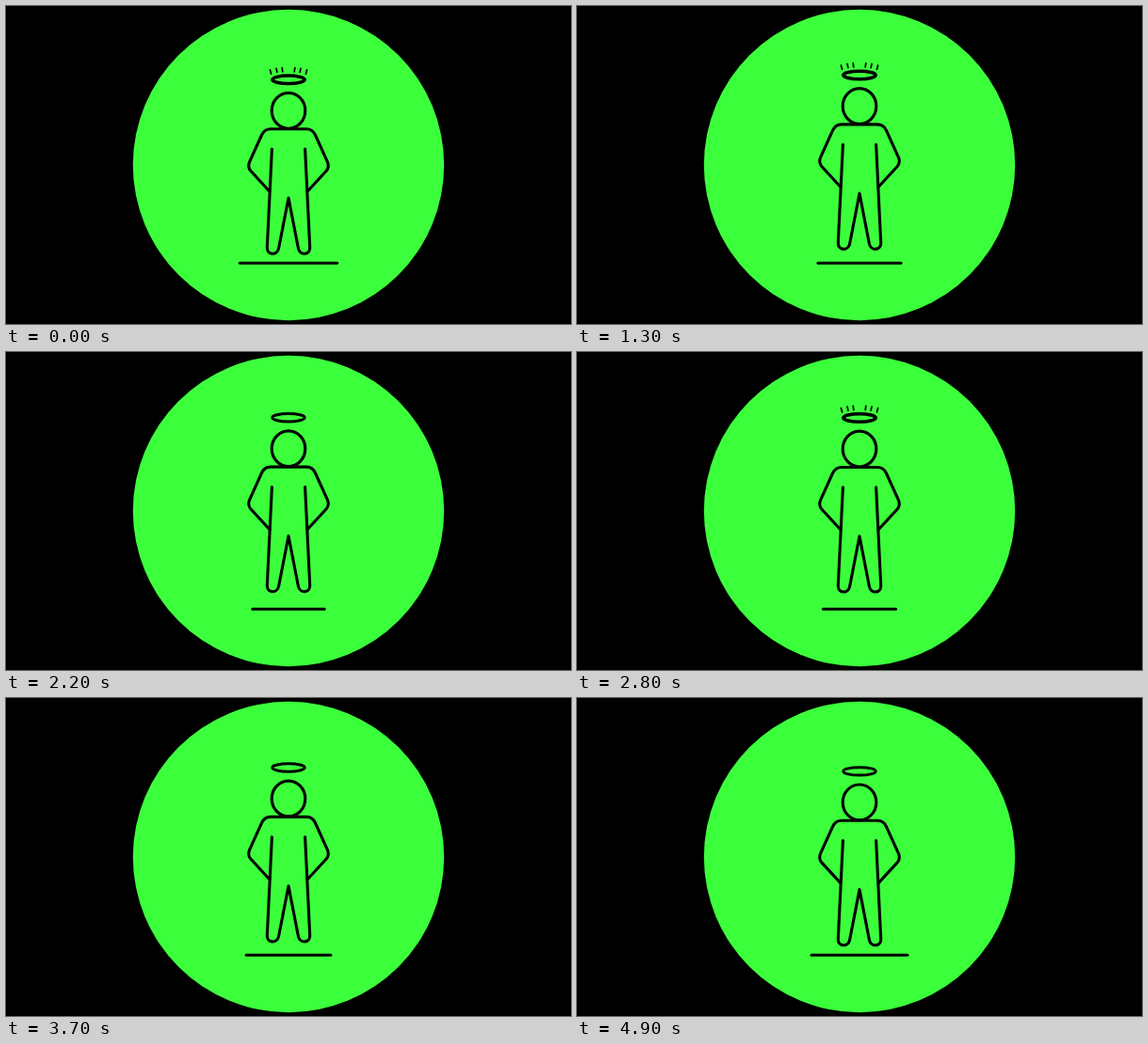
Animation, 600 px wide and 338 px high, one loop 5000 ms. Source, as an HTML page:

```html
<!DOCTYPE html>
<html lang="en">
<head>
<meta charset="utf-8">
<title>Floating figure</title>
<style>
  html, body { margin: 0; width: 100%; height: 100%; overflow: hidden; background: #000; }
  svg { display: block; width: 100vw; height: 100vh; }
  .ink { fill: none; stroke: #000; stroke-width: 3.1; stroke-linecap: round; stroke-linejoin: round; }
</style>
</head>
<body>
<svg viewBox="0 0 600 338">
  <circle cx="300" cy="169" r="165.2" fill="#3cff3c"/>
  <g class="ink">
    <path id="ground"/>
    <g id="figure">
      <ellipse id="halo" cx="300" cy="78.3" rx="17.2" ry="4.2"/>
      <path id="rays" stroke-width="1.7" d="M280.4 67.8l1.2 4.4M287 66.3l.9 4.2M293.2 65.6l.6 4.2M319.6 67.8l-1.2 4.4M313 66.3l-.9 4.2M306.8 65.6l-.6 4.2"/>
      <ellipse cx="300" cy="111.3" rx="17.8" ry="18.9"/>
      <path d="M279.8 197L259.6 175Q256.4 171 258.6 165.6L271.6 137Q274.6 130.7 281 130.7H319Q325.4 130.7 328.4 137L341.4 165.6Q343.6 171 340.4 175L320.2 197"/>
      <path d="M282.4 152L277.3 256.5C277 265 288 265.5 289.6 257.5L300 204L310.4 257.5C312 265.5 323 265 322.7 256.5L317.6 152"/>
    </g>
  </g>
</svg>
<script>
  const LOOP = 5000, STEP = 100, BLINKS = 27;
  // Height at each turning point of the float, evenly spaced over the loop.
  const turns = [0, -12, 0.1, -12, 1, -12, 0];
  const el = id => document.getElementById(id);
  const figure = el('figure'), ground = el('ground'), halo = el('halo'), rays = el('rays');

  function lift(t) {
    const p = t / LOOP * (turns.length - 1);
    const i = Math.floor(p);
    const ease = (1 - Math.cos(Math.PI * (p - i))) / 2;
    return turns[i] + (turns[i + 1] - turns[i]) * ease;
  }

  function draw(t) {
    const y = lift(t);
    const half = 51.6 + 1.58 * y;
    const lit = (t / LOOP * BLINKS) % 1 < 0.44;
    figure.setAttribute('transform', `translate(0 ${y.toFixed(2)})`);
    ground.setAttribute('d', `M${300 - half} 273.3H${300 + half}`);
    rays.style.display = lit ? '' : 'none';
    halo.style.strokeWidth = lit ? 3.5 : 3;
  }

  const start = performance.now();
  function tick() {
    const t = (performance.now() - start) % LOOP;
    draw(Math.floor(t / STEP) * STEP);
    requestAnimationFrame(tick);
  }
  draw(0);
  requestAnimationFrame(tick);
</script>
</body>
</html>
```
